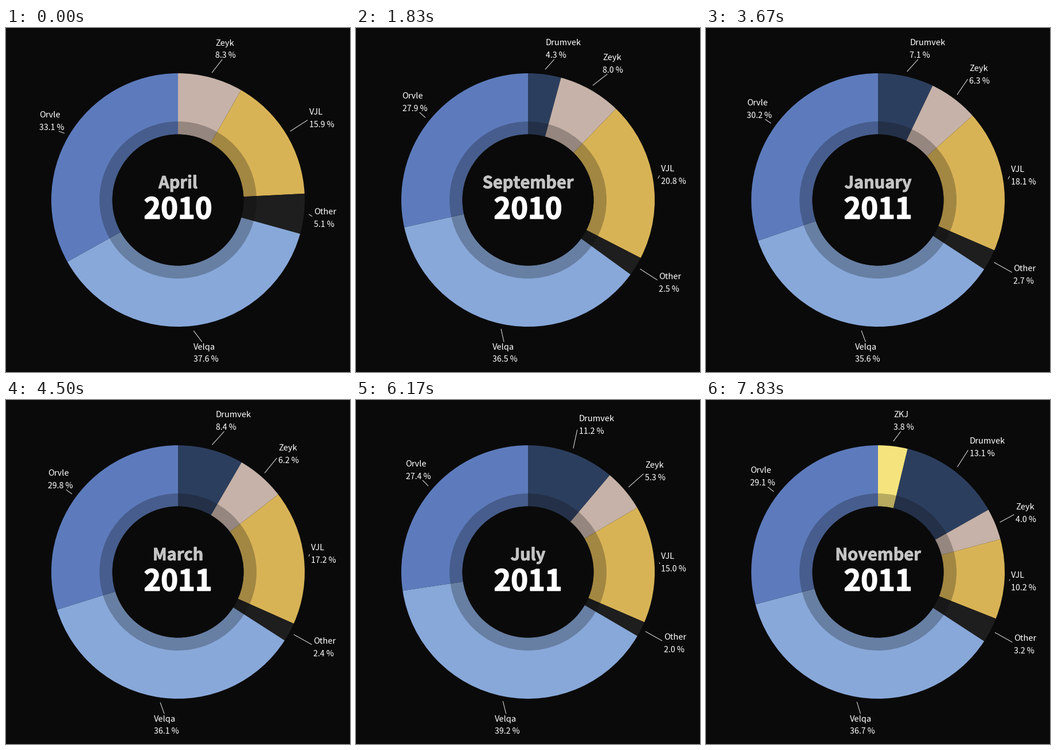
These frames come from a looping animation (600 px wide and 600 px high, 8000 ms). A matplotlib script:

```python
import numpy as np
import matplotlib.pyplot as plt
from matplotlib.animation import FuncAnimation
from matplotlib.patches import Circle, Wedge
from matplotlib.patheffects import withStroke

SIZE, DPI = 600, 100
LOOP, STEP = 8000, 40
TICK = 1000 / 12          # the chart redraws 12 times a second
BG = "#0a0a0a"
FONT = "Noto Sans CJK JP"
MID, R_OUT, R_IN, R_SHADE = 300, 221, 114.5, 137
MONTHS = ["January", "February", "March", "April", "May", "June", "July",
          "August", "September", "October", "November", "December"]

# clockwise slices: name, colour, turning points {months since April 2010: share}
# the slice without points takes what the others leave
SLICES = [
    ("ZKJ", "#f5e47e", {18: 0, 19: 3.76}),
    ("Drumvek", "#2c3e5e", {1: 0, 2: 3.8, 3: 3.8, 6: 4.6, 7: 5.63,
                            9: 7.1, 13: 9.63, 17: 12.7, 19: 13.07}),
    ("Zeyk", "#c6b2a8", {0: 8.3, 6: 7.9, 7: 7.0, 9: 6.3, 13: 6.0, 17: 4.7, 19: 4.0}),
    ("VJL", "#d8b356", {0: 15.9, 2: 17.1, 3: 19.0, 7: 22.63, 9: 18.1,
                        13: 16.23, 17: 13.7, 19: 10.17}),
    ("Other", "#1e1e1e", {0: 5.1, 1: 5.0, 2: 2.1, 3: 2.4, 7: 2.5, 9: 2.7,
                          13: 2.1, 17: 1.8, 19: 3.2}),
    ("Velqa", "#88a8d9", {}),
    ("Orvle", "#5d7bbc", {0: 33.1, 3: 30.1, 7: 25.7, 9: 30.2, 11: 29.8,
                          13: 27.6, 17: 27.1, 19: 29.1}),
]


def shares(month):
    out = np.array([np.interp(month, list(p), list(p.values())) if p else 0
                    for _, _, p in SLICES])
    rest = [not p for _, _, p in SLICES].index(True)
    out[rest] = 100 - out.sum()
    return out


def state(tick):
    """Month, its labelled shares, and the drawn shares, which trail at first."""
    month, phase = divmod(tick + 4, 5)
    now = shares(month)
    pie = now if phase >= 3 else (shares(month - 1) + now) / 2
    return month, now, pie


fig = plt.figure(figsize=(SIZE / DPI, SIZE / DPI), dpi=DPI, facecolor=BG)
ax = fig.add_axes([0, 0, 1, 1])
ax.set_xlim(0, SIZE)
ax.set_ylim(SIZE, 0)
ax.axis("off")


def px(n):
    return n * 72 / DPI


def text(x, y, size, color="white", **kw):
    return ax.text(x, y, "", fontsize=px(size), fontfamily=FONT,
                   va="baseline", color=color, **kw)


def heading(y, size, color, swell):
    t = text(MID, y, size, color, ha="center", weight="bold")
    t.set_path_effects([withStroke(linewidth=px(swell), foreground=color)])
    return t


wedges = [ax.add_patch(Wedge((MID, MID), R_OUT, 0, 1, width=R_OUT - R_IN,
                             fc=color, lw=0)) for _, color, _ in SLICES]
ax.add_patch(Wedge((MID, MID), R_SHADE, 0, 360, width=R_SHADE - R_IN,
                   fc=BG, alpha=0.26, lw=0))
ax.add_patch(Circle((MID, MID), R_IN, fc=BG, lw=0))
leaders = [ax.plot([], [], color="white", lw=px(0.9))[0] for _ in SLICES]
titles = [text(0, 0, 14.6) for _ in SLICES]
values = [text(0, 0, 14.2) for _ in SLICES]
month_text = heading(279.5, 29, "#c4c4c4", 0.9)
year_text = heading(332.5, 50.5, "white", 1.6)


def leader_end(cx, cy, w, sx, sy):
    """Point on the edge of a label box that faces the slice."""
    dx, dy = sx - cx, sy - cy
    if dx < 0 and abs(dy) < 1.08 * abs(dx):
        return cx - w / 2 - 3, cy + 9.5 * dy / abs(dx)
    return cx + 0.6 * dx / abs(dy) * w / 2, cy + np.sign(dy) * 19


def place_label(i, angle, share):
    title, value = titles[i], values[i]
    title.set_text(SLICES[i][0])
    value.set_text(f"{share:.1f} %")
    w = max(t.get_window_extent().width for t in (title, value))
    s, c = np.sin(angle), np.cos(angle)
    x = min(294.5 + 274.5 * s, 576 - w)
    y = np.clip(MID - 274 * c, 36, 566)
    title.set_position((x, y - 5.5))
    value.set_position((x, y + 16.5))
    sx, sy = MID + 230 * s, MID - 230 * c
    ex, ey = leader_end(x + w / 2, y, w, sx, sy)
    leaders[i].set_data([sx, ex], [sy, ey])


def draw(frame):
    tick = min(round(frame * STEP / TICK), int(LOOP / TICK) - 1)
    month, now, pie = state(tick)
    edges = np.concatenate([[0], np.cumsum(pie)]) * 3.6
    for i, wedge in enumerate(wedges):
        shown = now[i] > 0
        for part in (wedge, leaders[i], titles[i], values[i]):
            part.set_visible(shown)
        if shown:
            a, b = edges[i], edges[i + 1]
            wedge.set_theta1(a - 90)
            wedge.set_theta2(b - 90)
            place_label(i, np.radians((a + b) / 2), now[i])
    years, name = divmod(month + 3, 12)
    month_text.set_text(MONTHS[name])
    year_text.set_text(str(2010 + years))
    return []


anim = FuncAnimation(fig, draw, frames=LOOP // STEP, interval=STEP,
                     repeat=True, repeat_delay=0, blit=False)
plt.show()
```
